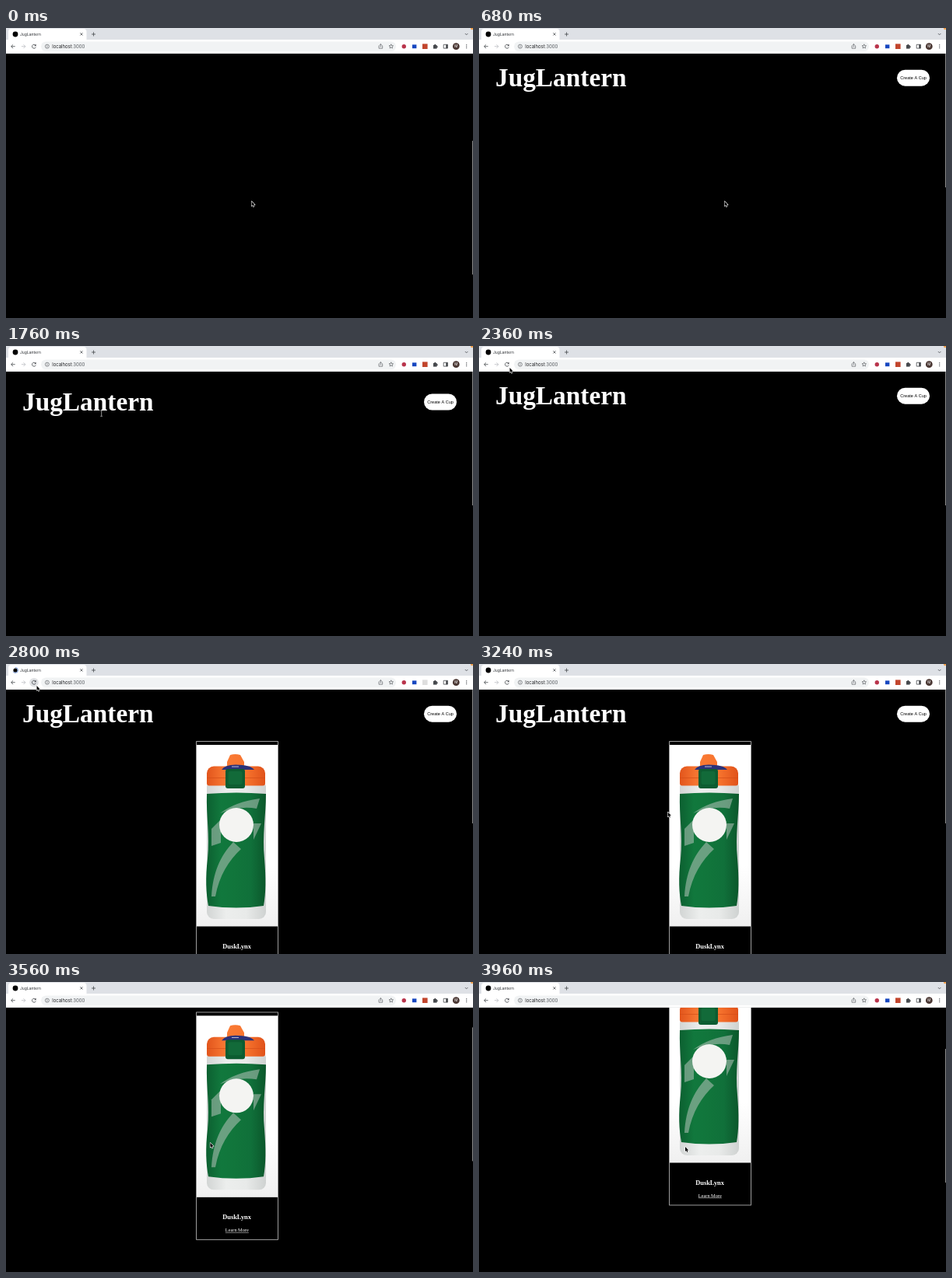
Write an HTML page with a canvas that moves like this. It is 600 by 373 pixels and loops after 4 s.

```html
<!DOCTYPE html>
<html lang="en">
<head>
<meta charset="utf-8">
<title>JugLantern</title>
<style>
html, body { margin: 0; width: 100%; height: 100%; overflow: hidden; background: #000; }
canvas { display: block; width: 600px; height: 373px; }
</style>
</head>
<body>
<canvas id="stage"></canvas>
<script>
const W = 600, H = 373, LOOP = 4000, STEP = 40, TOP = 33, BAR = 23.7;
const SERIF = '"Liberation Serif", serif';
const SANS = '"Liberation Sans", sans-serif';
const UI = 'Inter, sans-serif';
const INK = '#46494d';

const canvas = document.getElementById('stage');
const ratio = window.devicePixelRatio || 1;
canvas.width = W * ratio;
canvas.height = H * ratio;
const c = canvas.getContext('2d');

// Motion
const easeOut = p => 1 - (1 - p) ** 2;
const smooth = p => p * p * (3 - 2 * p);
const ramp = (t, from, to, ease) => ease(Math.min(1, Math.max(0, (t - from) / (to - from))));

function scrollAt(t) {
  const arrive = 222 * (1 - ramp(t, 0, 640, easeOut));
  const swing = 299 * (ramp(t, 700, 1280, smooth) - ramp(t, 1280, 1660, smooth));
  const bounce = -9 * Math.sin(Math.PI * ramp(t, 1660, 1960, p => p));
  const browse = 105 * ramp(t, 3366, 3920, easeOut);
  return arrive + swing + bounce + browse;
}

function pointerAt(t) {
  const toReload = ramp(t, 1640, 1906, easeOut);
  const toCard = ramp(t, 2880, 3320, smooth);
  const drift = ramp(t, 3440, 3960, smooth);
  return {
    x: 315.5 - 276 * toReload + 222.5 * toCard + 3 * drift,
    y: 223 - 195 * toReload + 178 * toCard + 6 * drift
  };
}

// Drawing helpers
function rect(x, y, w, h, fill) {
  c.fillStyle = fill;
  c.fillRect(x, y, w, h);
}

function round(x, y, w, h, r, fill) {
  c.beginPath();
  c.roundRect(x, y, w, h, r);
  c.fillStyle = fill;
  c.fill();
}

function disc(x, y, r, fill) {
  c.beginPath();
  c.arc(x, y, r, 0, 7);
  c.fillStyle = fill;
  c.fill();
}

function arc(x, y, r, from, to, color = INK, width = 0.8) {
  c.beginPath();
  c.arc(x, y, r, from, to);
  c.strokeStyle = color;
  c.lineWidth = width;
  c.stroke();
}

function fill(path, color) {
  c.fillStyle = color;
  c.fill(new Path2D(path));
}

function line(path, color = INK, width = 0.8) {
  c.strokeStyle = color;
  c.lineWidth = width;
  c.stroke(new Path2D(path));
}

function text(str, x, y, font, color, align = 'left') {
  c.font = font;
  c.fillStyle = color;
  c.textAlign = align;
  c.fillText(str, x, y);
}

function blend(x0, y0, x1, y1, ...colors) {
  const g = c.createLinearGradient(x0, y0, x1, y1);
  colors.forEach((color, i) => g.addColorStop(i / (colors.length - 1), color));
  return g;
}

function drawBottle() {
  rect(245, 104, 104, 233.5, blend(0, 104, 0, 337, '#fff', '#fff', '#fff', '#f0f0f0'));
  round(258, 154, 76, 174, [4, 4, 9, 9], blend(258, 0, 334, 0, '#d2d5d4', '#eceeed', '#e8eae9', '#cfd2d1'));

  // sleeve with soft stripes
  c.save();
  c.clip(new Path2D('M258 167 Q296 164 334 167 C334 195 329 220 332 250 C334 275 334 295 331 311 Q296 316 260 311 C257 295 256 275 259 250 C262 220 257 195 258 167 Z'));
  rect(255, 160, 82, 160, blend(257, 0, 334, 0, '#0c5f30', '#11783d', '#11753b', '#10703a', '#0b572b'));
  const stripe = 'rgba(180,196,187,.55)';
  fill('M264 299 C266 268 275 247 292 229 L302 238 C286 253 274 272 269 299 Z', stripe);
  fill('M264 234 V212 L276 200 V230 Z', stripe);
  fill('M275 192 Q295 177 326 173 L322 186 Q300 182 275 192 Z', stripe);
  fill('M318 205 H328 L318 226 Z', stripe);
  c.restore();
  disc(296, 207, 22, '#f4f4f2');

  // lid
  const orange = blend(258, 0, 333, 0, '#e2551c', '#fa7b35', '#f7742e', '#e0521a');
  round(258, 131.5, 75, 25, [9, 9, 3, 3], orange);
  rect(258, 146, 75, 0.7, '#d54e18');
  fill('M288 117 Q294.5 115 301 117 L306 126 V132 H284 V126 Z', orange);
  fill('M277 136 Q281 129.5 295 129.5 Q314 129.5 319 136 Z', '#2b3279');
  rect(290, 131.6, 9, 0.9, '#c9cbe0');
  round(282, 135, 25, 25, 3, '#0d5c31');
  round(285.5, 138, 18, 17, 2, '#126a39');
}

function drawCard() {
  c.strokeStyle = '#c4c4c4';
  c.lineWidth = 0.8;
  c.strokeRect(244.6, 99.6, 104.8, 292.4);
  drawBottle();
  text('DuskLynx', 296.6, 365.7, 'bold 8.33px ' + SERIF, '#fff', 'center');
  text('Learn More', 296.8, 381.6, '6.3px ' + SERIF, '#fff', 'center');
  rect(281.8, 382.6, 30, 0.5, '#fff');
}

function drawPage(hasCard, scroll, thumbScroll) {
  rect(0, TOP, W, H - TOP, '#000');
  c.save();
  c.translate(0, -scroll);
  text('JugLantern', 21, 75.3, 'bold 33.33px ' + SERIF, '#fff');
  round(537, 53.7, 42, 21, 10.5, '#fff');
  text('Create A Cup', 558, 66.3, '5.56px ' + SANS, '#000', 'center');
  if (hasCard) drawCard();
  c.restore();
  rect(599, TOP + Math.max(0, thumbScroll) * 0.505, 1, 172, '#8c8c8c');
}

function drawTabs(loading) {
  rect(0, 0, W, 16, '#dee1e6');
  round(3, 1, 100.5, 16, [4, 4, 0, 0], '#fff');
  disc(12, 8, loading ? 2.6 : 3.4, '#000');
  if (loading) arc(12, 8, 3.4, -1.6, 2.6, '#4a78c8');
  text('JugLantern', 18, 9.8, '5px ' + UI, '#2c2f33');
  line('M95.3 6.3 l3.2 3.2 m0 -3.2 l-3.2 3.2');
  line('M110 8 h5 m-2.5 -2.5 v5');
  line('M589.8 7 l1.8 1.8 l1.8 -1.8');
  disc(598.6, 0.6, 1.6, '#f0a04c');
}

function drawStar(x, y, r) {
  c.beginPath();
  for (let i = 0; i < 10; i++) {
    const a = i * Math.PI / 5, d = i % 2 ? r * 0.45 : r;
    c.lineTo(x + d * Math.sin(a), y - d * Math.cos(a));
  }
  c.closePath();
  c.strokeStyle = INK;
  c.lineWidth = 0.6;
  c.stroke();
}

function drawArrow(x, dir, color) {
  line(`M${x - 2.5 * dir} ${BAR} h${5 * dir} m${-2.4 * dir} -2.4 l${2.4 * dir} 2.4 l${-2.4 * dir} 2.4`, color);
}

function drawToolbar(hover, loading) {
  rect(0, 15, W, 18, '#fff');
  rect(0, 32.6, W, 0.4, '#d5d7da');
  if (hover) disc(36, BAR, 5.8, '#dfe1e4');
  drawArrow(9.2, -1, INK);
  drawArrow(22.4, 1, '#b9bcc0');
  arc(36, BAR, 2.5, 0.4, 5.6);
  fill('M38.6 20.8 v2.4 h-2.4 Z', INK);

  // address field
  round(45, 17.4, 456, 12.6, 6.3, '#f1f3f4');
  arc(52.9, BAR, 2.5, 0, 7, INK, 0.6);
  line('M52.9 23.3 v1.7 m0 -2.9 v.6', INK, 0.6);
  const font = '5.95px ' + UI;
  text('localhost', 59.2, 25.8, font, '#202124');
  text(':3000', 59.2 + c.measureText('localhost').width, 25.8, font, '#55595e');
  line('M480 22.8 h-.9 v3.4 h4.6 v-3.4 h-.9 M481.4 24.6 v-4 m-1.2 1.2 l1.2 -1.2 l1.2 1.2', INK, 0.6);
  drawStar(494.8, BAR, 2.9);

  // extensions and profile
  disc(511.3, BAR, 2.7, '#b9344c');
  rect(522, 21.4, 5.4, 4.8, '#1747c0');
  rect(535, 20.4, 6.6, 6.6, loading ? '#dedede' : '#c2452d');
  rect(549, 22, 4.6, 4.6, INK);
  disc(551.3, 21.8, 1, INK);
  disc(553.8, 24.3, 1, INK);
  line('M562.2 21.3 h5.2 v4.8 h-5.2 Z');
  rect(565.2, 21.3, 2.2, 4.8, INK);
  disc(578.3, BAR, 4.4, '#4a3733');
  text('M', 578.3, 25.4, '4.6px ' + UI, '#fff', 'center');
  for (let i = -1; i < 2; i++) disc(591.7, BAR + i * 2, 0.6, INK);
}

function drawPointer({ x, y }, scroll) {
  c.save();
  c.translate(x, y);
  const overTitle = x > 21 && x < 190 && y > 52 - scroll && y < 84 - scroll;
  if (overTitle) {
    const beam = 'M-1.2 -3.6 h2.4 M0 -3.6 v7.2 M-1.2 3.6 h2.4';
    line(beam, '#ddd', 1);
    line(beam, '#222', 0.5);
  } else {
    const arrow = 'M0 0 V6 L1.4 4.8 L2.3 7 L3.3 6.6 L2.4 4.4 H4.3 Z';
    c.lineJoin = 'round';
    line(arrow, '#fff', 1.1);
    fill(arrow, '#000');
  }
  c.restore();
}

function draw(t) {
  const scroll = scrollAt(t);
  const loading = t >= 2640 && t < 2960;
  c.setTransform(ratio, 0, 0, ratio, 0, 0);
  // The browser bars cover whatever scrolls above the page
  drawPage(t >= 2720, scroll, scrollAt(Math.max(0, t - STEP)));
  drawTabs(loading);
  drawToolbar(t >= 2440 && t < 2920, loading);
  drawPointer(pointerAt(t), scroll);
}

const start = performance.now();
function tick() {
  const t = (performance.now() - start) % LOOP;
  draw(Math.floor(t / STEP) * STEP);
  requestAnimationFrame(tick);
}
tick();
</script>
</body>
</html>
```
